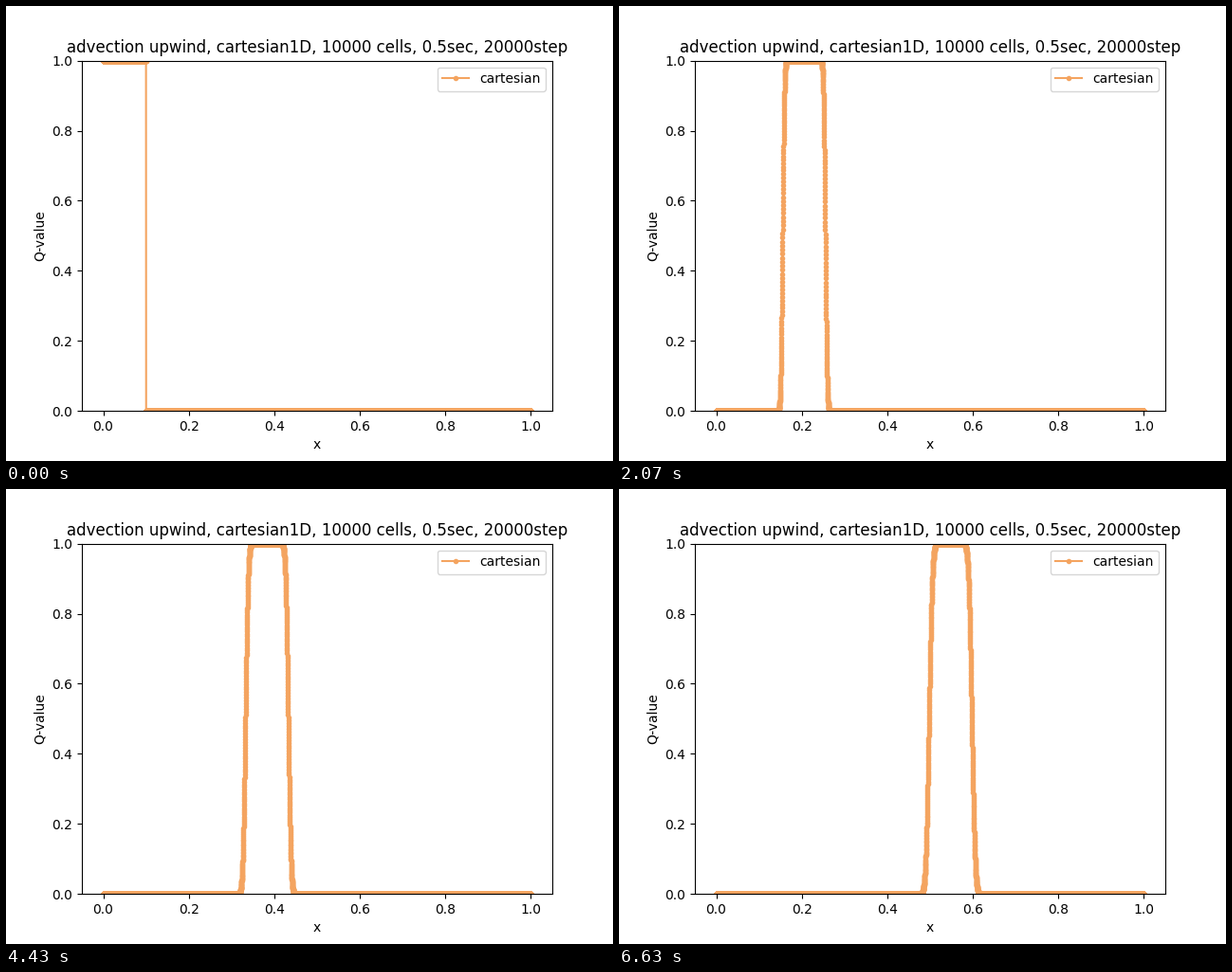
Recreate the animation shown at these times as a matplotlib script. Size 640 px wide and 480 px high, loop 6660 ms.

```python
import numpy as np
import matplotlib.pyplot as plt
from matplotlib.animation import FuncAnimation

CELLS = 10000
FRAMES = 200
LOOP_MS = 6660
STEPS_PER_FRAME = 100
COURANT = 0.25

x = (np.arange(CELLS) + 0.5) / CELLS


def upwind_history():
    """Advect a square pulse with first-order upwind, one row per frame."""
    q = np.where(x <= 0.1, 1.0, 0.0)
    rows = [q.copy()]
    for _ in range(FRAMES - 1):
        for _ in range(STEPS_PER_FRAME):
            q[1:] -= COURANT * (q[1:] - q[:-1])
            q[0] *= 1 - COURANT  # nothing flows in
        rows.append(q.copy())
    return rows


history = upwind_history()

fig, ax = plt.subplots(figsize=(6.4, 4.8), dpi=100)
line, = ax.plot(x, history[0], marker=".", color="sandybrown", label="cartesian")
ax.set_xlim(-0.05, 1.05)
ax.set_ylim(0, 1)
ax.set_xlabel("x")
ax.set_ylabel("Q-value")
ax.set_title("advection upwind, cartesian1D, 10000 cells, 0.5sec, 20000step")
ax.legend(loc="upper right")


def update(i):
    line.set_ydata(history[i])
    return line,


anim = FuncAnimation(fig, update, frames=FRAMES, interval=LOOP_MS / FRAMES,
                     repeat=True, repeat_delay=0)
plt.show()
```
